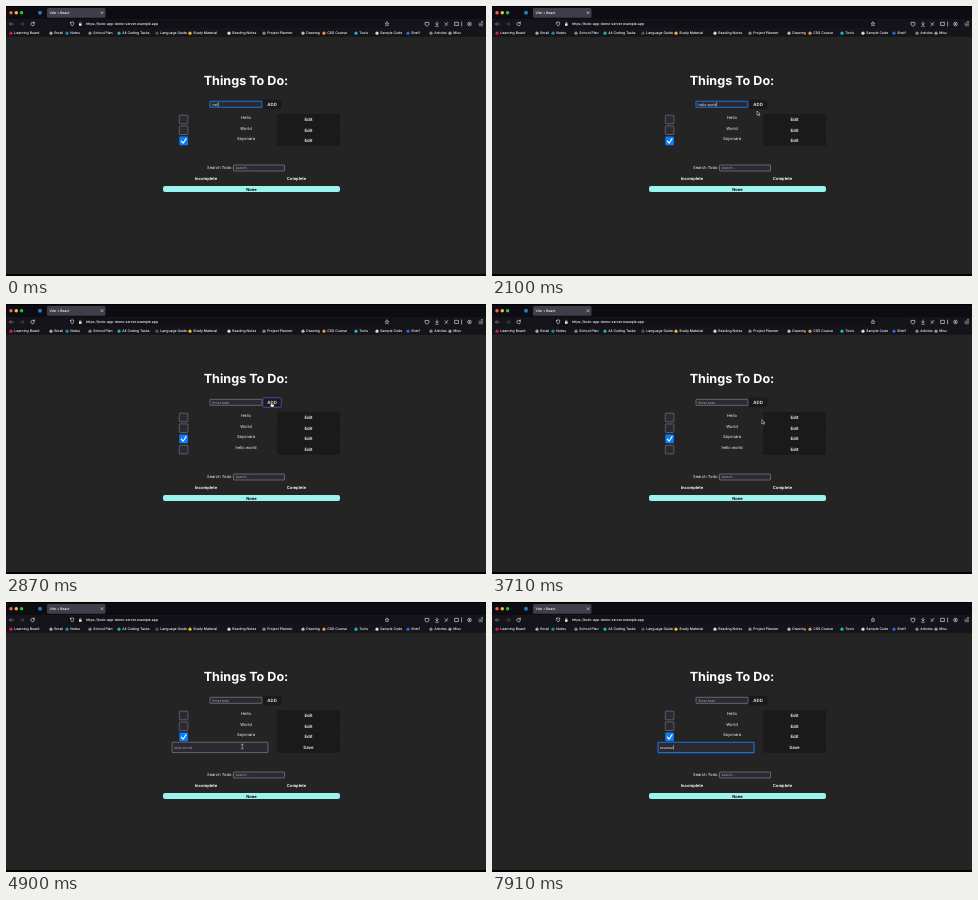
Recreate the animation shown at these times as an HTML page. Size 480 by 270 pixels, loop 8000 ms.

```html
<!DOCTYPE html>
<html lang="en">
<head>
<meta charset="utf-8">
<title>Things To Do</title>
<style>
html, body { margin: 0; width: 100%; height: 100%; overflow: hidden; background: #000; }
svg { display: block; width: 100vw; height: 100vh; }
text { font-family: Inter, "Open Sans", sans-serif; font-size: 4.1px; fill: #f4f4f4; white-space: pre; text-rendering: geometricPrecision; }
.mid { text-anchor: middle; }
.bold { font-weight: 700; }
.medium { font-weight: 600; font-size: 4.4px; }
.small { font-size: 3.45px; }
.chrome { font-size: 3.45px; font-weight: 500; fill: #fff; }
.hint { fill: #a6a6b2; }
</style>
</head>
<body>
<svg id="stage" viewBox="0 0 480 270"></svg>
<script>
const LOOP = 8000, SHIFT = 11, BORDER = "#8f8f9d";
const svg = document.getElementById("stage");

function el(tag, attrs = {}, parent = svg) {
  const node = document.createElementNS("http://www.w3.org/2000/svg", tag);
  for (const k in attrs) node.setAttribute(k, attrs[k]);
  parent.appendChild(node);
  return node;
}
const set = (node, attrs) => { for (const k in attrs) node.setAttribute(k, attrs[k]); };
const show = (node, on) => node.setAttribute("visibility", on ? "visible" : "hidden");
const group = (parent = svg) => el("g", {}, parent);
const rect = (x, y, width, height, fill, rx = 0, parent = svg) =>
  el("rect", { x, y, width, height, fill, rx }, parent);
const line = (d, stroke, width = 0.6, parent = svg) =>
  el("path", { d, stroke, fill: "none", "stroke-width": width, "stroke-linecap": "round", "stroke-linejoin": "round" }, parent);
function text(str, x, y, cls = "", parent = svg) {
  const node = el("text", { x, y, class: cls }, parent);
  node.textContent = str;
  return node;
}

function drawBrowser() {
  rect(0, 0, 480, 270, "#000");
  rect(0, 1, 480, 11.5, "#0c0c12");
  rect(0, 12.5, 480, 18, "#15141b");
  rect(0, 30.5, 480, 237.5, "#242424");
  ["#ff5f57", "#febc2e", "#28c840"].forEach((fill, i) =>
    el("circle", { cx: 5 + i * 5.3, cy: 6.7, r: 1.7, fill }));
  el("circle", { cx: 34, cy: 6.8, r: 2, fill: "#1a7fc4" });
  rect(41, 2, 58.5, 9.8, "#3f3e4a", 1.5);
  text("Vite + React", 43.5, 8.2, "chrome");
  line("M95 5.7l2 2m0 -2l-2 2", "#fff", 0.5);

  line("M7.5 18h-4m1.6 -1.6l-1.6 1.6l1.6 1.6", "#aaa", 0.5);
  line("M14 18h4m-1.6 -1.6l1.6 1.6l-1.6 1.6", "#66656e", 0.5);
  line("M28.2 17a1.8 1.8 0 1 0 .2 1.6m0 -2.6v1.2h-1.2", "#eee", 0.6);
  rect(61.5, 14, 324, 8, "#121117", 1.5);
  line("M64.6 16.4l1.6 -.6l1.6 .6q0 2.7 -1.6 3.7q-1.6 -1 -1.6 -3.7z", "#eee", 0.6);
  rect(73, 17.5, 2.6, 2.3, "#eee", 0.3);
  line("M73.6 17.5v-.7a.7 .7 0 0 1 1.4 0v.7", "#eee", 0.4);
  text("https://todo-app-demo-server.example.app", 80, 19.3, "chrome");
  line("M381 16l.6 1.3l1.4 .1l-1.1 1l.4 1.4l-1.3 -.8l-1.3 .8l.4 -1.4l-1.1 -1l1.4 -.1z", "#eee", 0.5);
  line("M419.4 16.4h3.4v2.6l-1.7 1.2l-1.7 -1.2z", "#eee", 0.6);
  line("M431 16v2.8m-1.2 -1.2l1.2 1.2l1.2 -1.2m-2.6 2.6h2.8", "#eee", 0.6);
  line("M439 19.8l2.8 -3.4m-2.8 .4l2.4 2.4", "#eee", 0.6);
  line("M449 16.3h3.4v3.2h-3.4zM455.6 16v4", "#eee", 0.6);
  el("circle", { cx: 463.5, cy: 18, r: 1.8, fill: "none", stroke: "#eee", "stroke-width": 0.6 });
  el("circle", { cx: 463.5, cy: 18, r: 0.8, fill: "#eee" });
  line("M473 17.2h3.6m-3.6 1.3h3.6m-3.6 1.3h3.6", "#eee", 0.4);
  el("circle", { cx: 476, cy: 15.8, r: 0.9, fill: "#37c9a0" });

  [[5, "#d81b60", "Learning Board"], [45, "#aaa", "Email"], [61, "#168fa0", "Notes"],
   [84, "#888", "School Plan"], [113, "#1fb6a6", "All Coding Tasks"], [151, "#555", "Language Guide"],
   [184, "#f0bd2b", "Study Material"], [223, "#ddd", "Reading Notes"], [258, "#888", "Project Planner"],
   [297, "#bbb", "Drawing"], [318, "#e49a48", "CSS Course"], [350, "#18b6d2", "Tools"],
   [371, "#ddd", "Sample Code"], [402, "#3465d8", "Shelf"], [425, "#888", "Articles"],
   [444, "#999", "Misc"]].forEach(([x, fill, label]) => {
    el("circle", { cx: x, cy: 27.2, r: 1.6, fill });
    text(label, x + 3.3, 28.4, "chrome");
  });
}

function field(x, y, w, h, parent = svg) {
  return el("rect", { x, y, width: w, height: h, rx: 0.5, fill: "#2b2a33", stroke: BORDER, "stroke-width": 0.6 }, parent);
}
function focus(box, on, amount = 1) {
  set(box, on ? { stroke: "#1d6fd8", "stroke-width": 0.6 + 0.5 * amount }
              : { stroke: BORDER, "stroke-width": 0.6 });
}
function checkbox(x, y, on, parent) {
  const box = rect(x, y, 8.6, 8.6, on ? "#0a7cff" : "#2b2a33", 0.8, parent);
  if (on) line(`M${x + 2} ${y + 4.6}l1.8 2l3 -4.6`, "#fff", 1.1, parent);
  else set(box, { stroke: BORDER, "stroke-width": 0.5 });
}
function button(label, x, y, w, h, parent = svg) {
  const box = rect(x, y, w, h, "#1a1a1a", 1.6, parent);
  const caption = text(label, x + w / 2, y + h / 2 + 1.6, "mid medium", parent);
  return { box, caption, x, y, w, h };
}
function row(i, label, on) {
  const y = 108 + i * 10.7, all = group(), left = group(all);
  checkbox(173.3, y + 1.2, on, left);
  text(label, 240, y + 4.9, "mid", left);
  return { all, left, btn: button("Edit", 271, y, 63, 10.7, all) };
}

drawBrowser();
set(text("Things To Do:", 240, 79, "mid bold"), { style: "font-size: 12.6px; fill: #fff" });

const addBox = field(204, 95.3, 52, 6);
const addText = text("", 206.5, 99.6, "small");
const addCaret = rect(0, 96.2, 0.4, 4.3, "#fff");
const addBtn = button("ADD", 256.8, 93.8, 18.6, 9.4);

const rows = ["Hello", "World", "Sayonara", "hello world"].map((s, i) => row(i, s, i === 2));
const fresh = rows[3];
const editor = group(fresh.all);
const editBox = field(166, 140.2, 96, 10.4, editor);
const editText = text("", 168, 146.8, "small", editor);
const editCaret = rect(0, 143, 0.4, 4.8, "#fff", 0, editor);

const bar = rect(157, 180, 177, 6, "#9af3ec", 2);
const lower = group();
text("Search Todo:", 201, 163.4, "", lower);
field(227.5, 159, 51, 6, lower);
text("search...", 229.5, 163.2, "small hint", lower);
text("Incomplete", 200, 174, "mid bold", lower);
text("Complete", 290.5, 174, "mid bold", lower);
text("None", 245.5, 184.6, "mid bold", lower).style.fill = "#000";

const pointer = group();
const arrow = el("path", { d: "M0 0v4.2l1 -.9l.7 1.5l.8 -.4l-.7 -1.4h1.3z", fill: "#000", stroke: "#fff", "stroke-width": 0.5 }, pointer);
const hand = el("path", { d: "M-.5 -.5q.5 -.6 1 0v1.6l1.7 .5q.6 .3 .4 1l-.4 1.5h-2.4l-1.5 -2q.2 -.7 1.2 0z", fill: "#fff", stroke: "#111", "stroke-width": 0.35 }, pointer);
const beam = line("M-.9 -2.4q.9 0 .9 .7v3.4q0 .7 -.9 .7m1.8 -4.8q-.9 0 -.9 .7m.9 4.1q-.9 0 -.9 -.7", "#ddd", 0.5, pointer);

const clamp = v => Math.max(0, Math.min(1, v));
const span = (t, a, b) => clamp((t - a) / (b - a));
const smooth = x => x * x * (3 - 2 * x);
const easeOut = x => 1 - (1 - x) ** 3;

// time, x, y
const path = [[1820, 284, 132], [2100, 265, 105], [2310, 265.5, 99], [3400, 265.5, 99],
  [4200, 278.5, 148.5], [4340, 278.5, 148.5], [4900, 236.3, 144.5], [8000, 236.3, 144.5]];
function mouseAt(t) {
  let i = 0;
  while (i < path.length - 2 && t >= path[i + 1][0]) i++;
  const [a, ax, ay] = path[i], [b, bx, by] = path[i + 1], k = smooth(span(t, a, b));
  return [ax + (bx - ax) * k, ay + (by - ay) * k];
}

const addKeys = [0, 0, 0, 0, 210, 420, 700, 840, 1050, 1120, 1330];
const editKeys = [6440, 7000, 7140, 7350, 7560, 7700, 7910];
const typed = (str, keys, t) => str.slice(0, keys.filter(k => t >= k).length);
function fill(node, str, hint) {
  node.textContent = str || hint;
  node.setAttribute("class", str ? "small" : "small hint");
}
function scaleAt(node, k, x, y) {
  const s = 0.5 + 0.5 * k;
  set(node, { transform: `translate(${x} ${y}) scale(${s}) translate(${-x} ${-y})`, opacity: Math.sqrt(k) });
  show(node, k > 0);
}

function render(t) {
  const typing = t < 2380, added = t >= 2390;
  fill(addText, added ? "" : typed("hello world", addKeys, t), "Enter todo");
  focus(addBox, typing);
  show(addCaret, typing);
  if (typing) set(addCaret, { x: 206.8 + addText.getComputedTextLength() });

  const enter = span(t, 2390, 2870);
  scaleAt(fresh.all, easeOut(enter), 243, 145.5);
  set(lower, { transform: `translate(0 ${added ? SHIFT : 0})` });
  set(bar, { y: 180 + SHIFT * smooth(enter) });

  const editing = t >= 4300;
  fresh.btn.caption.textContent = editing ? "Save" : "Edit";
  scaleAt(fresh.left, 1 - span(t, 4300, 4500), 214, 145.5);
  scaleAt(editor, easeOut(span(t, 4500, 4900)), 214, 145.5);
  show(fresh.left, added && t < 4500);
  focus(editBox, t >= 5250, span(t, 5180, 5390));
  const word = typed("revenue", editKeys, t);
  fill(editText, word, "hello world");
  show(editCaret, (t >= 5250 && t < 5880) || t >= 7910);
  set(editCaret, { x: 168 + (word ? editText.getComputedTextLength() + 0.2 : -0.4) });

  const [mx, my] = mouseAt(t), live = t >= 1820 && t < 6440;
  let over = false;
  [addBtn, ...rows.map(r => r.btn)].forEach(b => {
    const hit = live && mx > b.x && mx < b.x + b.w && my > b.y && my < b.y + b.h;
    over = over || hit;
    set(b.box, { stroke: hit ? "#646cff" : "none", "stroke-width": 0.6 });
  });
  const inField = t > 4500 && mx < 262;
  set(pointer, { transform: `translate(${mx} ${my})` });
  show(hand, live && over);
  show(beam, live && inField);
  show(arrow, live && !over && !inField);
}

const start = performance.now();
function tick() {
  render((performance.now() - start) % LOOP);
  requestAnimationFrame(tick);
}
render(0);
requestAnimationFrame(tick);
</script>
</body>
</html>
```
